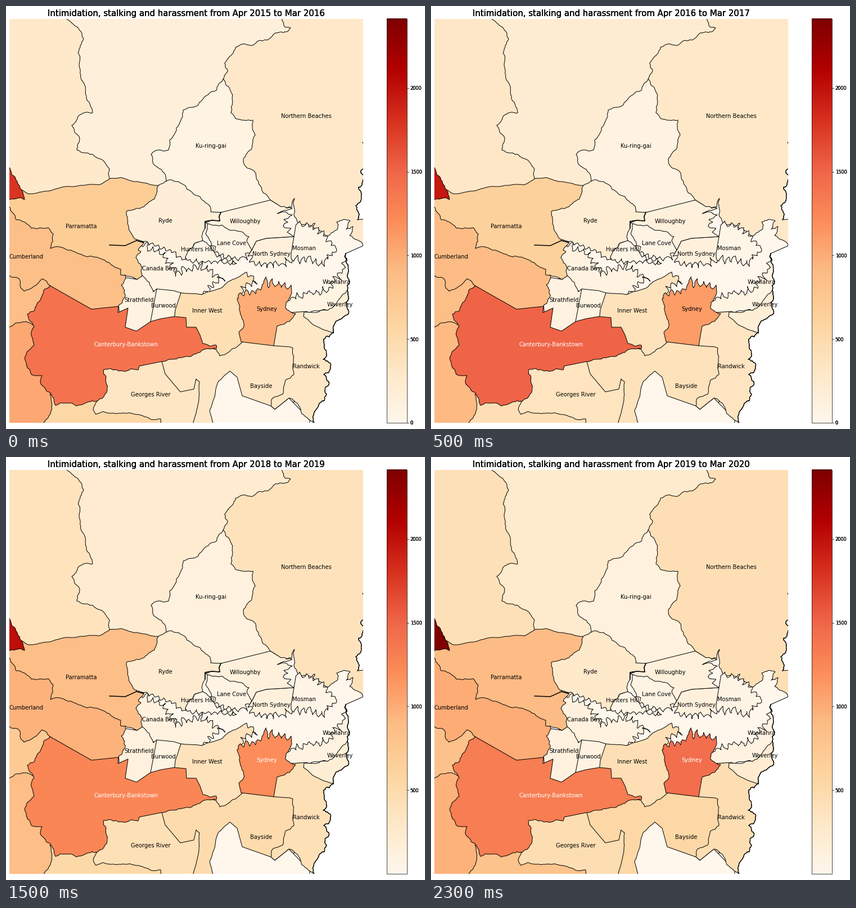
A matplotlib script for the animation above (2.5 s loop, 745x752 px).

```python
import random

import matplotlib
import matplotlib.pyplot as plt
import numpy as np
from matplotlib.animation import FuncAnimation
from matplotlib.patches import Polygon, Rectangle

W, H, DPI = 745, 752, 100
PX = 72 / DPI  # points per pixel
VMAX = 2415
YEARS = 5
LEFT, RIGHT, TOP, BOTTOM = 6, 635, 22.5, 741
CMAP = matplotlib.colormaps["OrRd"]

plt.rcParams["font.family"] = "DejaVu Sans"
fig = plt.figure(figsize=(W / DPI, H / DPI), dpi=DPI, facecolor="white")
ax = fig.add_axes([0, 0, 1, 1])
ax.axis("off")

rng = random.Random(11)
frame_box = Rectangle((LEFT, TOP), RIGHT - LEFT, BOTTOM - TOP,
                      transform=ax.transData)
regions = []
layer = 10


# Borders are lists of complex points, built from a few corners.

def straight(*xy):
    return [complex(x, y) for x, y in zip(xy[::2], xy[1::2])]


def bend(a, b, wobble):
    """Fractal line from a up to, but not including, b."""
    if abs(b - a) < 5:
        return [a]
    mid = (a + b) / 2 + 1j * (b - a) * rng.uniform(-wobble, wobble)
    return bend(a, mid, wobble) + bend(mid, b, wobble)


def rough(*xy, wobble=0.13):
    pts = straight(*xy)
    out = []
    for a, b in zip(pts, pts[1:]):
        out += bend(a, b, wobble)
    return out + pts[-1:]


def coves(*xy, depth=6):
    """Shore that swings from side to side in narrow inlets."""
    pts = straight(*xy)
    out, side = [], 1
    for a, b in zip(pts, pts[1:]):
        steps = max(1, round(abs(b - a) / 5.5))
        normal = 1j * (b - a) / abs(b - a)
        for k in range(steps):
            swing = side * depth * rng.uniform(0.2, 1.1)
            out.append(a + (b - a) * k / steps + normal * swing)
            side = -side
    out.append(pts[-1])
    shore = []
    for a, b in zip(out, out[1:]):
        shore += bend(a, b, 0.2)
    return shore + out[-1:]


def line(border, width=1.0):
    global layer
    layer += 1
    z = np.array(border)
    art, = ax.plot(z.real, z.imag, color="black", lw=width * PX, zorder=layer)
    art.set_clip_path(frame_box)


def region(values, border, name=None, x=0, y=0, edge="black"):
    """Add an area; it hides the borders of the ones before it.

    Two values are the ends of a steady trend, five are yearly counts.
    """
    global layer
    layer += 1
    if len(values) == 2:
        values = np.linspace(*values, YEARS)
    z = np.array(border)
    area = Polygon(np.column_stack([z.real, z.imag]), ec=edge, lw=PX,
                   joinstyle="round", zorder=layer)
    ax.add_patch(area)
    area.set_clip_path(frame_box)
    label = None
    if name:
        label = ax.text(x, y + 4, name, ha="center", va="baseline",
                        fontsize=9.967 * PX, zorder=500)
    regions.append((area, values, label))


# Northern districts
region([285, 420], straight(-10, -10, 300, -10, 300, 345, -10, 345))
region([160, 225, 165, 240, 265],
       rough(107, 10, 107, 22, 124, 36, 138, 58, 131, 110, 143, 160, 154, 190,
             132, 193, 117, 212, 131, 235, 126, 256, 162, 270, 184, 290,
             184, 306)
       + straight(200, 340, 480, 340, 540, 100, 540, 10))

# Harbour waters
region([0, 0],
       straight(240, 415, 470, 345, 514, 340, 640, 400, 640, 424, 605, 440,
                605, 520, 500, 535, 300, 520), edge="none")
line(straight(640, 424, 604, 440))

region([85, 130],
       rough(386, 130, 374, 150, 348, 168, 315, 185, 308, 210, 291, 238,
             289, 256, 270, 256, 258, 264, 264, 283, 284, 303, 286, 313)
       + straight(300, 335, 364, 368, 383, 367, 480, 352, 460, 205, 412, 190,
                  412, 130), "Ku-ring-gai", 364, 248)
ocean = rough(625, 380, 622, 355, 632, 335, 627, 322, 637, 305, 631, 293,
              640, 285, wobble=0.25)
region([295, 310, 380, 390, 440],
       rough(489, 10, 490, 22, 497, 38, 506, 39, 488, 46, 456, 62, 440, 69,
             415, 70, 405, 80, 392, 97, 393, 118, 386, 130, wobble=0.2)
       + rough(386, 130, 398, 148, 400, 190, 408, 200, 439, 203, 436, 255,
               422, 272, 426, 285, 444, 297, 449, 316, 470, 345)
       + rough(483, 353, 508, 358, 513, 342, 513, 362, 526, 389, 540, 390,
               556, 398, 572, 409, 590, 395, 588, 384, 612, 382, 605, 397,
               617, 392, 611, 408, 635, 426, wobble=0.2)
       + straight(645, 426, 645, 378) + ocean + straight(640, 10),
       "Northern Beaches", 534, 195)
line(ocean, 1.3)
line(straight(637, 240, 634, 243, 637, 246))

# Lower north shore
region([80, 80],
       rough(358, 387, 355, 405, 366, 425)
       + coves(366, 425, 374, 441, 395, 448, 425, 448, 437, 434, depth=5)
       + straight(445, 405, 420, 390), "Lane Cove", 401.5, 421)
region([140, 140],
       straight(437, 434, 445, 418, 463, 413, 512, 410, 520, 420)
       + coves(510, 448, 490, 460, 465, 462, 440, 455, 430, 445, depth=7),
       "North Sydney", 472, 440)
region([50, 70],
       coves(516, 386, 545, 391, 565, 408, 588, 431, 572, 450)
       + coves(572, 455, 540, 453, 507, 448, depth=8)
       + straight(507, 440, 512, 410), "Mosman", 530.5, 430)
region([130, 140],
       straight(382, 367, 470, 345, 483, 353)
       + coves(494, 356, 500, 402, depth=13)
       + straight(512, 410, 463, 413, 445, 418, 437, 434)
       + rough(428, 418, 432, 410, 408, 399, 358, 387, 353, 384, 372, 375),
       "Willoughby", 425.5, 382)

# Along the river
region([110, 120],
       straight(225, 480, 235, 420)
       + coves(245, 424, 280, 440, 300, 475, 345, 462, 385, 484, 350, 513,
               depth=8)
       + straight(311, 515, 268, 508, 240, 500), "Canada Bay", 271.5, 466)
region([105, 120],
       straight(195, 480, 233, 486, 242, 479) + rough(242, 479, 262, 508)
       + straight(268, 503, 270, 570, 232, 585, 205, 580),
       "Strathfield", 237, 522.5)

# Western side
region([870, 860, 700, 720, 830],
       straight(-10, 470, 90, 470, 90, 600, -10, 600))
region([1030, 915, 905, 870, 970],
       rough(-10, 580, 6, 571, 28, 562, 38, 562, 50, 568)
       + straight(120, 600, 120, 760, -10, 760))
region([860, 1000],
       straight(-10, 340, 60, 380, 210, 470)
       + rough(213, 484, 205, 496, 211, 505, 212, 516, 200, 534, wobble=0.2)
       + straight(190, 548, 152, 545, 78, 497)
       + rough(78, 497, 64, 485, 32, 507, 22, 484, 6, 479, -10, 480,
               wobble=0.18), "Cumberland", 36.5, 445)
region([690, 645, 770, 870, 895],
       rough(-10, 325, 22, 325, 40, 334, 100, 322, 165, 318, 184, 307,
             205, 305, 233, 312, 271, 319, wobble=0.06)
       + straight(275, 340, 230, 380, 232, 417)
       + rough(245, 421, 235, 434, 240, 437, 231, 447, 242, 464, 242, 480)
       + rough(233, 486, 204, 478, 204, 468, 165, 448, 145, 446, 115, 434,
               79, 431, 84, 405, 75, 394, 45, 395, 18, 380, 6, 357, -10, 350),
       "Parramatta", 134, 391)
region([1790, 1960, 1800, 2020, VMAX],
       rough(0, 275, 6, 287, 20, 312, 33, 344, 12, 343, 0, 349))
river = straight(382, 367, 379, 374, 380, 382, 366, 381, 354, 383, 354, 395)
region([185, 280],
       rough(271, 319, 283, 312, 307, 312, 322, 326, 345, 339, 363, 356,
             364, 366)
       + river + rough(350, 402, 350, 417, 335, 422, 319, 447)
       + coves(319, 452, 285, 432, 245, 419, depth=4)
       + rough(229, 414, 216, 386, 214, 365, 238, 360, 264, 343, 271, 319),
       "Ryde", 283, 381)
line(river, 1.6)
line(straight(184, 425, 212, 426, 232, 417, 245, 420), 1.5)
region([40, 50],
       rough(350, 417, 370, 437)
       + coves(376, 444, 410, 456, 365, 456, 322, 452, depth=5)
       + rough(319, 447, 335, 422), "Hunters Hill", 340, 432)

# Southern side
region([540, 440, 460, 530, 820],
       rough(78, 690, 80, 720, 67, 741)
       + straight(60, 760, 345, 760, 345, 720, 200, 690))
region([340, 460],
       straight(160, 640, 285, 625, 350, 660, 350, 760, 277, 760)
       + rough(275, 734, 258, 735, 220, 723, 172, 721, 160, 726, 155, 717,
               164, 700, 164, 690, wobble=0.08), "Georges River", 257, 690)
region([335, 550],
       straight(277, 625, 277, 632, 283, 654, 310, 686, 334, 681)
       + rough(338, 663, 344, 668, 341, 710, 331, 745, wobble=0.06)
       + straight(331, 760, 480, 760, 520, 690, 520, 607, 420, 590, 370, 600),
       "Bayside", 453.5, 675)
region([0, 0],
       straight(398, 649, 411, 660, 420, 693, 471, 711, 478, 717, 503, 697,
                540, 735, 540, 760, 368, 760)
       + rough(368, 741, 362, 720, 378, 667, 398, 649, wobble=0.06))

# Eastern suburbs
cliffs = rough(604, 440, 608, 460, 611, 490, 607, 505, wobble=0.2)
beach = rough(607, 505, 609, 520, 606, 535, 609, 547, wobble=0.2)
bay = rough(582, 581, 587, 560, 609, 547)
coast = rough(582, 581, 565, 592, 570, 620, 564, 628, 577, 644, 565, 655,
              574, 668, 570, 690, 556, 710, 547, 727, 548, 741, wobble=0.28)
region([90, 105],
       coves(604, 446, 600, 470, 583, 490, 575, 505, 540, 508, 505, 523,
             depth=7)
       + straight(490, 530, 500, 545, 530, 544)
       + rough(530, 544, 572, 541) + straight(600, 540) + cliffs[::-1],
       "Woollahra", 587.5, 490)
region([325, 460],
       coast + rough(538, 735, 520, 710, 503, 697)
       + straight(478, 717, 471, 711)
       + rough(471, 711, 474, 697, 492, 690, 497, 665, 512, 655, 510, 638,
               510, 608)
       + straight(505, 606, 476, 604, 470, 585, 475, 565, 505, 545, 535, 543),
       "Randwick", 534, 640)
region([190, 190, 180, 190, 240],
       rough(530, 544, 529, 552, 545, 566, 582, 581, wobble=0.05)
       + bay + beach[::-1] + rough(607, 505, 597, 515, 572, 541, 550, 545),
       "Waverley", 594, 530)
line(coast, 1.3)
line(cliffs + beach + bay[::-1], 1.4)

# Inner city
region([450, 400, 380, 390, 440],
       rough(311, 510, 348, 513, 385, 500, 395, 490, 428, 473, wobble=0.06)
       + coves(434, 478, 445, 490, 420, 500, 414, 512, depth=5)
       + straight(425, 520, 430, 597, 421, 597)
       + rough(408, 608, 380, 622, 374, 611)
       + straight(340, 600, 310, 570, 290, 553), "Inner West", 357.5, 541)
region([85, 95],
       straight(268, 503, 298, 506, 311, 510, 301, 540, 299, 560, 257, 570,
                257, 561), "Burwood", 280, 532.5)
region([1000, 1110, 1140, 1212, 1440],
       coves(412, 513, 453, 505, depth=6) + coves(456, 492, 507, 496, depth=10)
       + rough(508, 510, 498, 527, 497, 537, 515, 547, 504, 561, 482, 569)
       + straight(476, 604, 418, 597)
       + rough(414, 580, 422, 572, 415, 540, 411, 520), "Sydney", 464, 538)
region([1400, 1510, 1320, 1260, 1325],
       straight(78, 497, 152, 539, 200, 534, 199, 545, 217, 537, 212, 571,
                232, 578, 257, 561, 275, 556, 299, 552, 320, 554, 321, 571,
                338, 571, 345, 585)
       + rough(350, 600, 374, 603, 374, 609, 349, 612, 307, 625, 277, 632)
       + straight(237, 640, 235, 647)
       + rough(222, 645, 173, 647, 178, 660, 176, 690, 163, 702, 125, 711,
               88, 710, 79, 688, 62, 672, 64, 657, 45, 655, 36, 638, 38, 614,
               50, 603, 46, 588, 50, 570, 38, 548, 50, 542, 62, 520, 78, 497,
               wobble=0.16), "Canterbury-Bankstown", 213.5, 601)

# Colour bar
ax.imshow(np.linspace(0, 1, 256)[:, None], cmap=CMAP, origin="lower",
          extent=(677, 713, BOTTOM, TOP), aspect="auto",
          interpolation="nearest", zorder=2)
ax.set(xlim=(0, W), ylim=(H, 0))
ax.add_patch(Rectangle((677, TOP), 36, BOTTOM - TOP, fill=False,
                       ec="black", lw=0.7 * PX, zorder=3))
zero_mark = []
for tick in range(0, VMAX, 500):
    y = BOTTOM - (BOTTOM - TOP) * tick / VMAX
    marks = ax.plot([713, 716], [y, y], color="black", lw=0.7 * PX, zorder=3)
    marks += [ax.text(718.8, y, str(tick), va="center_baseline",
                      fontsize=8.306 * PX) for _ in range(3)]
    if tick == 0:
        zero_mark = marks

# Stacked copies give the title its heavy edges
titles = [ax.text(320, 18, "", ha="center", va="baseline",
                  fontsize=14.95 * PX) for _ in range(3)]


def update(i):
    for area, values, label in regions:
        area.set_facecolor(CMAP(values[i] / VMAX))
        if label:
            label.set_color("white" if values[i] > VMAX / 2 else "black")
    for mark in zero_mark:
        mark.set_visible(i < 2)
    for title in titles:
        title.set_text("Intimidation, stalking and harassment from "
                       f"Apr {2015 + i} to Mar {2016 + i}")
    return []


anim = FuncAnimation(fig, update, frames=YEARS, interval=500,
                     init_func=lambda: [], repeat=True, repeat_delay=0)
plt.show()
```
